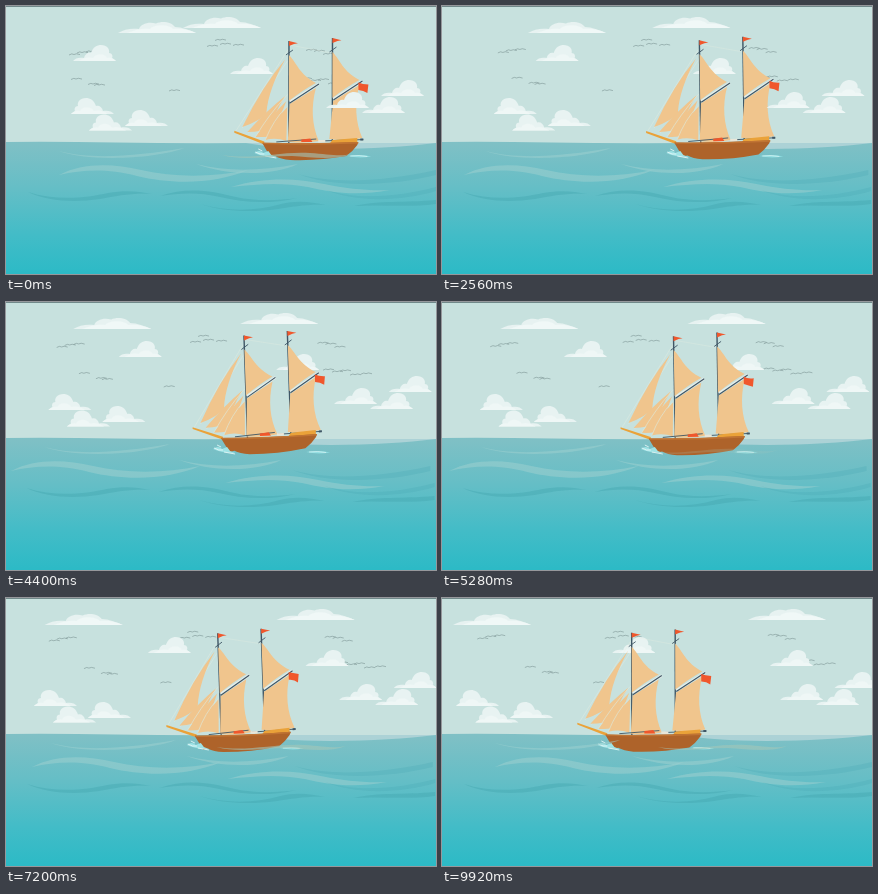
Animation of 430 by 268 pixels, one loop 10 s. Source, as an HTML page with a canvas:

```html
<!DOCTYPE html>
<html lang="en">
<head>
<meta charset="utf-8">
<title>Sailing ship</title>
<style>
html, body { margin: 0; width: 100%; height: 100%; overflow: hidden; background: #c7e1de; }
canvas { display: block; width: 430px; height: 268px; }
</style>
</head>
<body>
<canvas id="stage"></canvas>
<script>
const W = 430, H = 268, LOOP = 10000, STEP = 80;
const canvas = document.getElementById('stage');
const dpr = window.devicePixelRatio || 1;
canvas.width = W * dpr;
canvas.height = H * dpr;
const ctx = canvas.getContext('2d');

const SAIL = '#f0c58d', MAST = '#3f5665', RED = '#f0572c', ORANGE = '#eaa239';

// Interpolates [time, value] pairs, optionally easing each span.
function track(keys, t, smooth) {
  let i = 0;
  while (i < keys.length - 2 && t >= keys[i + 1][0]) i++;
  const [t0, a] = keys[i], [t1, b] = keys[i + 1];
  let p = Math.min(1, Math.max(0, (t - t0) / (t1 - t0)));
  if (smooth) p = p * p * (3 - 2 * p);
  return a + (b - a) * p;
}

function shape(d, fill) {
  ctx.fillStyle = fill;
  ctx.fill(new Path2D(d));
}

function line(d, color, width) {
  ctx.strokeStyle = color;
  ctx.lineWidth = width;
  ctx.stroke(new Path2D(d));
}

function at(x, y, draw, sx = 1) {
  ctx.save();
  ctx.translate(x, y);
  ctx.scale(sx, 1);
  draw();
  ctx.restore();
}

// Clouds are drawn from the bottom left corner; flip mirrors the hump.
function smallCloud(x, y, flip) {
  at(flip ? x + 43 : x, y, () => {
    shape('M0 0C2-3 7-4 11-3C12-7 15-9 18-8C20-14 24-16 28-16C34-16 37-12 36-8C39-8 40-5 39-3L43 0Z', '#e8f3f2');
    shape('M6 0C11-4 17-4 20-3C23-8 32-8 34-3C38-4 41-2 43 0Z', '#eff7f6');
  }, flip ? -1 : 1);
}

function bigCloud(x, y) {
  at(x, y, () => {
    shape('M0 0C6-4 14-5 21-4C23-9 30-11.5 38-9.5C44-12.5 54-11 57-6C64-6 71-3 78 0Z', '#e7f2f1');
    shape('M9 0C18-4 26-5 32-4C36-9 51-9 55-4C64-5 72-3 78 0Z', '#f0f8f7');
  });
}

function backClouds(t) {
  bigCloud(112 - 10.18 * t, 27);
  bigCloud(177 + 13 * t, 22);
  smallCloud(67 + 10.4 * t, 55);
  smallCloud(224 + 10.48 * t, 68);
  smallCloud(65 - 5.14 * t, 108, true);
  smallCloud(83 - 5 * t, 124.5, true);
  smallCloud(119 - 5.14 * t, 120, true);
}

function frontClouds(t) {
  smallCloud(320 + 1.82 * t, 102);
  smallCloud(375 + 1.77 * t, 90);
  smallCloud(356 + 1.82 * t, 107);
}

// x, y, velocity x, velocity y, then the birds as offset pairs.
const flocks = [
  [63, 45, -2.8, -.8, [0, 3, 8, 1, 17, 0]],
  [65, 72.5, 1.8, -.4, [0, 0, 17, 5, 23, 6]],
  [163, 84, -1.2, 0, [0, 0]],
  [201, 33.5, -3.85, 0, [0, 6, 8, 0, 13, 4, 26, 5]],
  [300, 43.5, 2.6, -.7, [0, 0, 8, 1, 17, 4]],
  [295, 72, 5, -1.1, [0, 0, 9, 2, 17, 1, 27, 5, 38, 4]]
];

function birds(t) {
  for (const [x, y, vx, vy, group] of flocks) {
    for (let i = 0; i < group.length; i += 2) {
      at(x + vx * t + group[i], y + vy * t + group[i + 1], () =>
        line('M0 1Q3-1 5 .5Q7-1 11 .6', '#6d8484', .5));
    }
  }
}

function sea() {
  const g = ctx.createLinearGradient(0, 136, 0, H);
  g.addColorStop(0, '#80c0c5');
  g.addColorStop(.35, '#65bec6');
  g.addColorStop(.7, '#43bcc7');
  g.addColorStop(1, '#2cbac6');
  shape('M0 136Q50 135.5 110 136.5T250 137H430V268H0Z', g);
  shape('M240 137H430Q385 142.5 325 143Q270 142.5 240 137Z', 'rgba(187,216,220,.75)');
}

function waves(sway) {
  const light = 'rgba(157,208,207,.55)', dark = 'rgba(67,165,174,.42)', faint = 'rgba(67,165,174,.25)';
  const shift = (k, draw) => at(-sway * k, 0, draw);
  shift(.3, () => shape('M53 145C85 154 133 150 178 142C150 153 82 156 53 145Z', light));
  shift(1, () => shape('M53 169C76 157 105 157 135 164C170 172 208 171 242 164C207 179 164 178 131 170C100 162 76 164 53 169Z', light));
  shift(.35, () => shape('M190 158C221 166 255 165 292 158C265 171 219 169 190 158Z', light));
  shift(.12, () => {
    shape('M225 181C258 171 290 172 318 178C342 183 363 185 384 184C352 190 326 187 302 181C276 176 252 178 225 181Z', light);
    shape('M292 168C326 178 376 176 430 164V169C382 181 323 181 292 168Z', faint);
  });
  shift(.03, () => {
    shape('M22 186C50 195 80 192 102 187C119 184 132 185 146 188C125 187 111 190 94 193C67 197 41 195 22 186Z', dark);
    shape('M154 190C180 181 203 184 230 191C247 195 270 195 291 192C262 199 236 196 214 191C192 186 174 187 154 190Z', dark);
    shape('M194 198C222 206 250 205 275 198C291 194 306 196 320 199C301 198 287 201 272 203C242 207 215 205 194 198Z', dark);
    shape('M348 200C374 194 397 197 430 194V198C400 202 376 198 348 200Z', dark);
    shape('M320 184C355 195 395 190 430 181V185C393 196 348 196 320 184Z', faint);
  });
}

function jibs() {
  line('M282 43L229 126M281 55L236 122M282 88L242 127', 'rgba(232,239,226,.75)', .5);
  shape('M279 53Q256 80 236 121Q254 115 260 107Q262 83 279 53Z', SAIL);
  shape('M279 90Q261 104 241 126Q256 126 265 121Q267 108 279 90Z', SAIL);
  shape('M280 95Q265 110 249 131Q262 132 270 128Q272 114 280 95Z', SAIL);
  shape('M281 101Q268 114 259 134Q270 131 280 135Z', SAIL);
  line('M279 91Q263 108 249 131M280 101Q267 114 259 134', '#dfe6d5', .7);
}

// A mast with its topsail, gaff and main sail; foot is the sail's lower left corner.
function rig(x, y, gaffEnd, foot) {
  at(x, y, () => {
    line('M0 0V103', MAST, 1.4);
    shape('M0 14C8 22 10 33 27 42Q14 49 0 60Z', SAIL);
    shape(`M.8 63L27 47C22 66 23 84 30 100Q15 103 ${foot} 101Z`, SAIL);
    line(`M1 61L${gaffEnd} 43`, '#e7efeb', 2.6);
    line(`M1 62L${gaffEnd} 43`, MAST, 1.2);
    line('M-3 14L4 9', MAST, .9);
    shape('M0 0L9 2.2L5 3L0 5Z', RED);
  });
}

function hull() {
  shape('M228 125L258 135.5L258 138.5L228 126.8Z', ORANGE);
  line('M270 136L310 133M313 135L357 133.5', MAST, .9);
  shape('M295 133.5L304 132.5L306 136H295Z', RED);
  shape('M312 134H319V136.5H312Z', '#e9e6d8');
  shape('M326 134L351 132V138H323Z', ORANGE);
  shape('M256 137Q303 138 352 136L351 139Q346 146 340 150Q312 155 284 154Q274 153 269 150L264 151Z', '#ae632a');
  shape('M256 136.5Q303 138 352 136V137.5Q304 139.5 257 138Z', '#c07434');
  shape('M354 132.5H357V134.5H354Z', MAST);
}

function foam() {
  shape('M248 147Q253 143 257 147L262 145L265 149L270 151Q258 151.5 248 147Z', '#9fe3e6');
  line('M249 146Q254 149 258 148M252 143L256 145M259 150L270 152', '#e4f7f6', .9);
  shape('M341 150Q352 148 365 150.5Q352 152.5 341 150Z', '#8edee2');
  line('M344 150Q353 149 361 150.5', '#d7f2f1', .8);
}

const tilt = [[0, .3], [2.56, -.6], [4.4, -1.8], [6.16, .2], [7.2, -1.8], [8.72, -.8], [9.92, .1], [10, .2]];
const heave = [[0, 0], [2.56, -1], [4.4, -2.4], [6.16, 0], [7.2, -.6], [8.72, 0], [9.92, -.4], [10, -.3]];
const swayKeys = [[0, 0], [2.56, 31], [4.35, 48], [5.05, 48], [6.16, 37], [7.2, 27], [8.72, 11], [9.92, 0], [10, 0]];
const crest = [[0, 1], [1.6, .5], [2.5, 0], [4.9, 0], [6, 1], [10, 1]];

function ship(t) {
  const drift = .3 - 9.37 * t;
  ctx.save();
  ctx.translate(305 + drift, 140 + track(heave, t, true));
  ctx.rotate((track(tilt, t, true) - .2) * Math.PI / 180);
  ctx.translate(-305, -140);
  jibs();
  line('M283 39L325 47', 'rgba(232,239,226,.6)', .5);
  rig(282.5, 35, 30, -1);
  rig(326, 32, 30, -3);
  const flap = Math.sin(t * 5);
  shape(`M352 76.5Q356 ${78.5 + flap} 362 78.5L361 87Q357 ${84.5 + flap} 352 84Z`, RED);
  hull();
  ctx.restore();
  at(drift, 0, foam);
}

function frame(now) {
  const t = Math.floor(now % LOOP / STEP) * STEP / 1000;
  const sway = track(swayKeys, t);
  ctx.setTransform(dpr, 0, 0, dpr, 0, 0);
  ctx.fillStyle = '#c7e1de';
  ctx.fillRect(0, 0, W, H);
  birds(t);
  backClouds(t);
  sea();
  ship(t);
  frontClouds(t);
  waves(sway);
  ctx.globalAlpha = track(crest, t);
  at(-sway * .2, 0, () =>
    shape('M216 149C248 154 276 145 304 147C322 148 334 151 345 148C328 155 304 151 286 150C260 150 238 155 216 149Z', 'rgba(164,199,185,.6)'));
  ctx.globalAlpha = 1;
  ctx.fillStyle = '#71898a';
  ctx.fillRect(0, 0, W, 1);
}

const start = performance.now();
function loop() {
  frame(performance.now() - start);
  requestAnimationFrame(loop);
}
loop();
</script>
</body>
</html>
```
